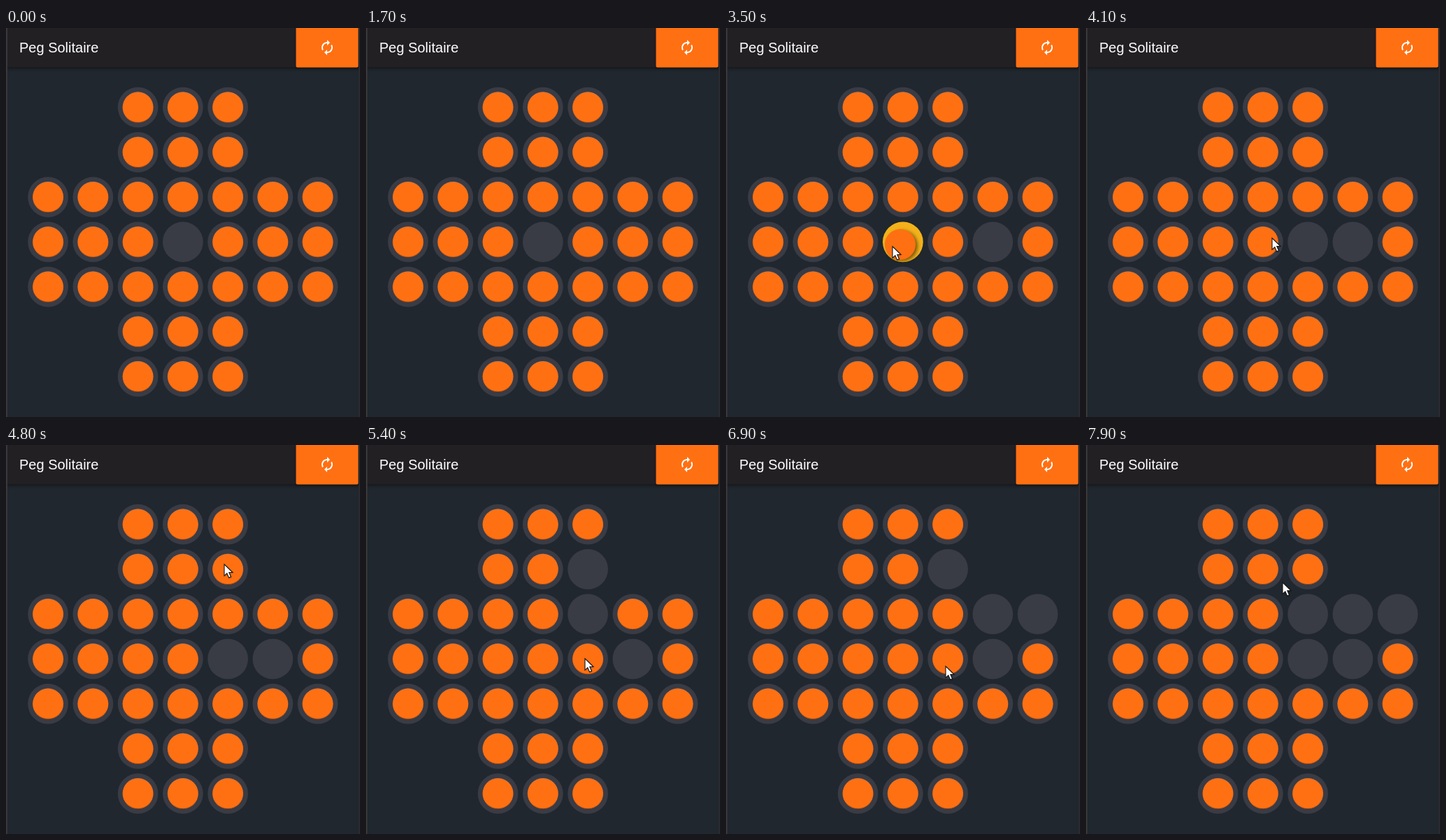
Animation, 506 px wide and 557 px high, one loop 8 s. Source, as an HTML page with a canvas:

```html
<!DOCTYPE html>
<html lang="en">
<head>
<meta charset="utf-8">
<title>Peg Solitaire</title>
<style>
  html, body { margin: 0; width: 100%; height: 100%; overflow: hidden; background: #20272e; }
  canvas { display: block; }
</style>
</head>
<body>
<canvas id="stage" width="506" height="557"></canvas>
<script>
const ctx = document.getElementById('stage').getContext('2d');
const LOOP = 8000, STEP = 100;
const HOLE_R = 28.9, PEG_R = 22;
const ORANGE = '#ff7012';
const center = ([col, row]) => [60.1 + 64.25 * col, 113.6 + 64.25 * row];
const onBoard = (col, row) => (col > 1 && col < 5) || (row > 1 && row < 5);
const key = (col, row) => col + ',' + row;
const ease = p => p * p * (3 - 2 * p);

// Pointer strokes: each eases from the previous end along a bowed line.
const ENTRY = { x: 496, y: 231 };
const strokes = [
  { start: 1500, steps: 5, x: 470, y: 1, bend: -75 },
  { start: 2100, steps: 6, x: 375, y: 309, bend: -55 },
  { start: 3000, steps: 3, x: 193, y: 316 },
  { start: 3300, steps: 2, x: 254, y: 313 },
  { start: 3500, steps: 1, x: 238, y: 312 },
  { start: 3600, steps: 1, x: 251, y: 330 },
  { start: 4100, steps: 2, x: 281, y: 270 },
  { start: 4400, steps: 5, x: 312, y: 170 },
  { start: 4900, steps: 4, x: 313, y: 305, bend: -18 },
  { start: 5500, steps: 2, x: 394, y: 240 },
  { start: 5800, steps: 3, x: 444, y: 245 },
  { start: 6200, steps: 5, x: 318, y: 251 },
  { start: 6700, steps: 3, x: 314, y: 316 },
  { start: 7200, steps: 4, x: 317, y: 170, bend: 9 },
  { start: 7800, steps: 2, x: 281, y: 196 }
];

// Each jump: drag and drop times, cells, and the peg's offset from the pointer.
const jumps = [
  { grab: 2900, drop: 4100, from: [5, 3], to: [3, 3], offset: [-5, -3] },
  { grab: 4900, drop: 5300, from: [4, 1], to: [4, 3], offset: [5, 8] },
  { grab: 6200, drop: 6600, from: [6, 2], to: [4, 2], offset: [2, -3] },
  { grab: 7200, drop: 7600, from: [4, 3], to: [4, 1], offset: [3, -10] }
];

const icon = new Path2D('M12 6v3l4-4-4-4v3c-4.42 0-8 3.58-8 8 0 1.57.46 3.03 1.24 4.26L6.7 14.8c-.45-.83-.7-1.79-.7-2.8 0-3.31 2.69-6 6-6zM18.76 7.74L17.3 9.2c.44.84.7 1.79.7 2.8 0 3.31-2.69 6-6 6v-3l-4 4 4 4v-3c4.42 0 8-3.58 8-8 0-1.57-.46-3.03-1.24-4.26z');
const arrow = new Path2D('M.5 .5V17L4.3 13.4 7.1 19.7 10 18.4 7.3 12.2H12.5Z');

function pointerAt(time) {
  const index = strokes.findLastIndex(s => s.start <= time);
  if (index < 0) return null;
  const a = strokes[index - 1] || ENTRY, b = strokes[index];
  const p = ease(Math.min(1, (time - b.start + STEP) / (b.steps * STEP)));
  const dx = b.x - a.x, dy = b.y - a.y;
  const bow = (b.bend || 0) * 4 * p * (1 - p) / Math.hypot(dx, dy);
  return [a.x + dx * p - dy * bow * -1, a.y + dy * p - dx * bow];
}

function boardAt(time) {
  const pegs = new Set();
  for (let row = 0; row < 7; row++)
    for (let col = 0; col < 7; col++)
      if (onBoard(col, row) && (col !== 3 || row !== 3)) pegs.add(key(col, row));
  let active = null;
  for (const jump of jumps) {
    const { from, to, grab, drop } = jump;
    if (time < grab) break;
    pegs.delete(key(...from));
    if (time < drop) { active = jump; break; }
    pegs.delete(key((from[0] + to[0]) / 2, (from[1] + to[1]) / 2));
    pegs.add(key(...to));
  }
  return { pegs, active };
}

function disc(x, y, r, fill) {
  ctx.beginPath();
  ctx.arc(x, y, r, 0, Math.PI * 2);
  ctx.fillStyle = fill;
  ctx.fill();
}

function shadow(color, blur, x, y) {
  ctx.shadowColor = color;
  ctx.shadowBlur = blur;
  ctx.shadowOffsetX = x;
  ctx.shadowOffsetY = y;
}

function drawPeg(x, y, lifted) {
  ctx.save();
  if (lifted) shadow('rgba(0,0,0,.5)', 5, 3, 2);
  disc(x, y, PEG_R, ORANGE);
  ctx.restore();
  if (lifted) return;
  const rim = ctx.createLinearGradient(0, y - PEG_R, 0, y + PEG_R);
  rim.addColorStop(0, 'rgba(150,125,115,.5)');
  rim.addColorStop(.3, 'rgba(150,125,115,0)');
  rim.addColorStop(.7, 'rgba(70,30,10,0)');
  rim.addColorStop(1, 'rgba(70,30,10,.5)');
  ctx.beginPath();
  ctx.arc(x, y, PEG_R - .3, 0, Math.PI * 2);
  ctx.strokeStyle = rim;
  ctx.lineWidth = 1;
  ctx.stroke();
}

function drawFrame() {
  ctx.fillStyle = '#20272e';
  ctx.fillRect(0, 0, 506, 557);

  ctx.save();
  shadow('rgba(0,0,0,.45)', 5, 0, 2);
  ctx.fillStyle = '#232024';
  ctx.fillRect(0, 0, 506, 56);
  ctx.restore();

  ctx.fillStyle = '#3a3838';
  ctx.fillRect(0, 0, 2, 557);
  ctx.fillStyle = '#2b2c30';
  ctx.fillRect(504, 0, 2, 557);

  ctx.save();
  shadow('rgba(0,0,0,.4)', 3, 0, 1);
  ctx.fillStyle = ORANGE;
  ctx.beginPath();
  ctx.roundRect(414.5, -2, 89, 58.5, 2);
  ctx.fill();
  ctx.restore();

  ctx.fillStyle = '#fff';
  ctx.font = '20px "Liberation Sans", Arial, sans-serif';
  ctx.fillText('Peg Solitaire', 19, 35);
  ctx.save();
  ctx.translate(447, 16);
  ctx.fill(icon);
  ctx.restore();
}

function drawPointer([x, y]) {
  ctx.save();
  ctx.translate(x - .5, y + .3);
  shadow('rgba(0,0,0,.35)', 2, 1, 1);
  ctx.fillStyle = '#fff';
  ctx.fill(arrow);
  shadow('transparent', 0, 0, 0);
  ctx.strokeStyle = '#151515';
  ctx.lineWidth = 1.1;
  ctx.stroke(arrow);
  ctx.restore();
}

function draw(time) {
  const { pegs, active } = boardAt(time);
  const pointer = pointerAt(time);
  drawFrame();

  for (let row = 0; row < 7; row++) {
    for (let col = 0; col < 7; col++) {
      if (!onBoard(col, row)) continue;
      const [x, y] = center([col, row]);
      const isTarget = active && key(...active.to) === key(col, row);
      const hot = isTarget && Math.hypot(pointer[0] - x, pointer[1] - y) < HOLE_R;
      disc(x, y, HOLE_R, hot ? '#f3b21b' : '#393b45');
      if (pegs.has(key(col, row))) drawPeg(x, y, false);
    }
  }

  // A dragged peg trails the pointer by one step.
  if (active) {
    const [x, y] = pointerAt(time - STEP);
    drawPeg(x + active.offset[0], y + active.offset[1], true);
  }
  if (pointer) drawPointer(pointer);
}

const begin = performance.now();
function tick() {
  const time = (performance.now() - begin) % LOOP;
  draw(Math.floor(time / STEP) * STEP);
  requestAnimationFrame(tick);
}
tick();
</script>
</body>
</html>
```
